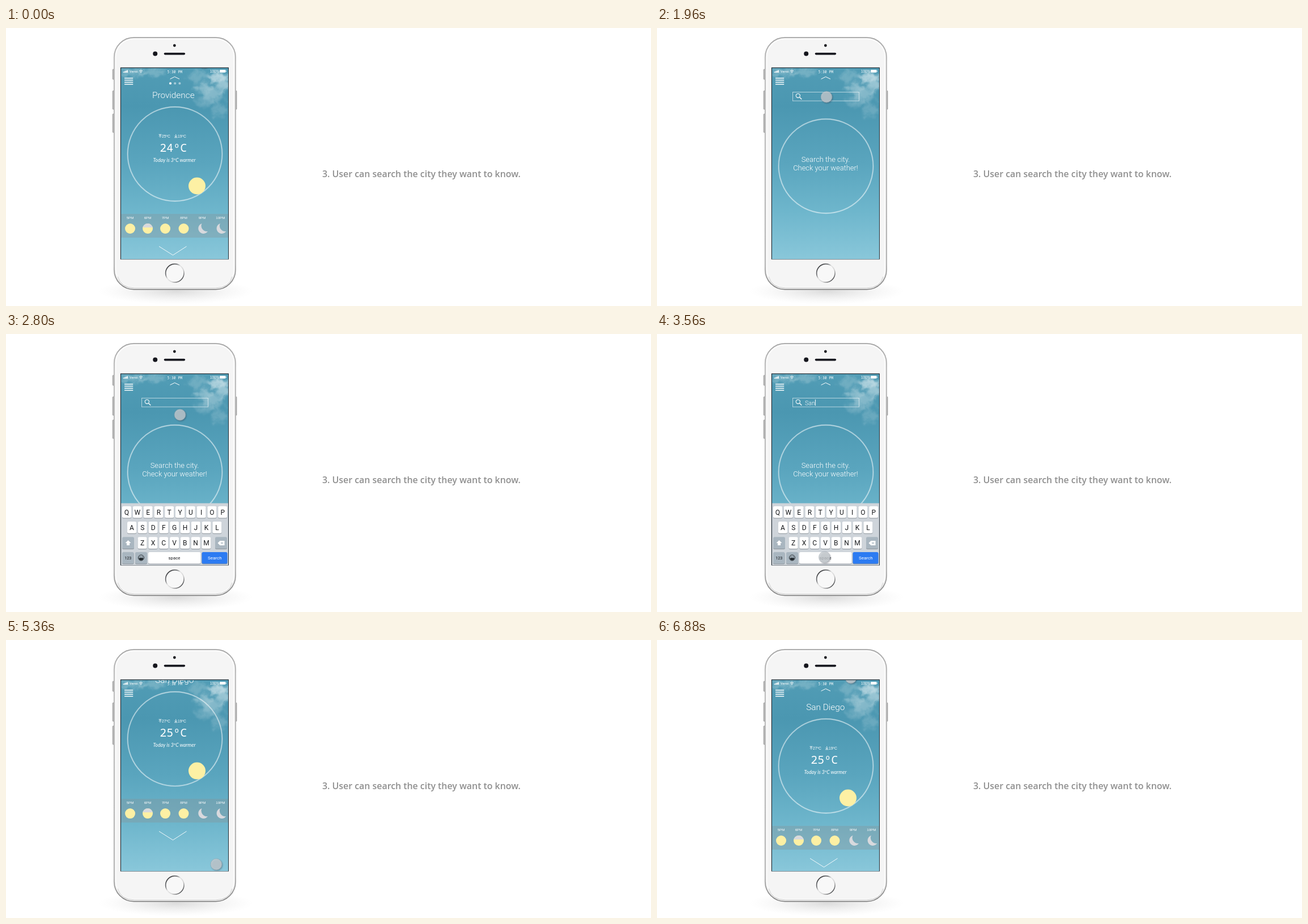
Animation, 1138 px wide and 492 px high, one loop 6920 ms. Source, as an HTML page:

```html
<!DOCTYPE html>
<html lang="en">
<head>
<meta charset="utf-8">
<title>City search</title>
<style>
html, body { margin: 0; width: 100%; height: 100%; overflow: hidden; background: #fff; }
svg { display: block; width: 100%; height: 100%; }
text { fill: #fff; font-family: Roboto, sans-serif; }
.light { font-weight: 300; }
.mid { text-anchor: middle; }
.tiny { font-family: "Liberation Sans", sans-serif; }
.mono { font-family: "Noto Sans Mono", monospace; }
.line { fill: none; stroke: #fff; }
</style>
</head>
<body>
<svg viewBox="0 0 1138 492">
  <defs>
    <linearGradient id="sky" x2="0" y2="1">
      <stop offset="0" stop-color="#519cb5"/>
      <stop offset=".2" stop-color="#4b97b1"/>
      <stop offset=".5" stop-color="#5aa5be"/>
      <stop offset=".75" stop-color="#6eb6cc"/>
      <stop offset="1" stop-color="#89c7da"/>
    </linearGradient>
    <linearGradient id="edge" x2="0" y2="1">
      <stop offset="0" stop-color="#9d9d9d"/>
      <stop offset=".1" stop-color="#b4b4b4"/>
      <stop offset=".9" stop-color="#a9a9a9"/>
      <stop offset="1" stop-color="#7c7c7c"/>
    </linearGradient>
    <linearGradient id="metal" x2="1" y2="1">
      <stop offset=".05" stop-color="#26272a"/>
      <stop offset=".3" stop-color="#6c6e71"/>
      <stop offset=".45" stop-color="#e6e6e6"/>
      <stop offset=".65" stop-color="#d2d2d2"/>
      <stop offset=".9" stop-color="#3a3b3e"/>
    </linearGradient>
    <radialGradient id="ground">
      <stop offset="0" stop-color="#777" stop-opacity=".26"/>
      <stop offset=".6" stop-color="#999" stop-opacity=".1"/>
      <stop offset="1" stop-color="#bbb" stop-opacity="0"/>
    </radialGradient>
    <filter id="cloudy" x="-30%" y="-30%" width="160%" height="160%">
      <feTurbulence type="fractalNoise" baseFrequency=".07" numOctaves="4" seed="8" result="n"/>
      <feGaussianBlur in="SourceGraphic" stdDeviation="3.5" result="b"/>
      <feDisplacementMap in="b" in2="n" scale="22" xChannelSelector="R" yChannelSelector="G"/>
    </filter>
    <filter id="soft" x="-50%" y="-50%" width="200%" height="200%"><feGaussianBlur stdDeviation="1.2"/></filter>
    <clipPath id="glass"><rect x="203" y="71" width="189" height="338"/></clipPath>
  </defs>

  <rect width="1138" height="492" fill="#fff"/>
  <ellipse cx="300" cy="466" rx="137" ry="23" fill="url(#ground)"/>
  <g fill="#b5b5b5" stroke="#808080" stroke-width=".6">
    <rect x="188.2" y="73" width="3" height="18" rx="1"/>
    <rect x="188.2" y="111" width="3" height="33" rx="1"/>
    <rect x="188.2" y="152" width="3" height="33" rx="1"/>
    <rect x="404" y="111" width="3" height="33" rx="1"/>
  </g>
  <rect x="190.7" y="16.7" width="214.4" height="446" rx="35" fill="#e4e4e4" stroke="url(#edge)" stroke-width="1.6"/>
  <rect x="193.5" y="19.2" width="208.8" height="440" rx="32" fill="#f5f5f5" stroke="#fff" stroke-width="1.4"/>
  <path d="M197 440Q203 459 226 460H370Q394 459 399 440" fill="none" stroke="#cfcfcf"/>
  <g fill="#15161d">
    <circle cx="297.3" cy="31" r="2.4"/>
    <circle cx="263.2" cy="45.6" r="4"/>
    <rect x="278.7" y="43.8" width="37.4" height="3.6" rx="1.8"/>
  </g>
  <circle cx="297.8" cy="433.8" r="16.2" fill="#f8f8f8" stroke="url(#metal)" stroke-width="1.6"/>
  <rect x="201.8" y="69.8" width="191.2" height="339.7" fill="#222d36"/>

  <g clip-path="url(#glass)">
    <rect x="203" y="71" width="189" height="338" fill="url(#sky)"/>
    <g id="clouds" fill="#d4e7ec" filter="url(#cloudy)"></g>
    <g id="status"></g>
    <g id="find"></g>
    <g id="home"></g>
    <g id="keys"></g>
    <g id="touch">
      <circle cx="1.2" cy="1.4" r="10.2" fill="#223" opacity=".3" filter="url(#soft)"/>
      <circle r="10" fill="#c9cfd3" opacity=".78" stroke="#98a2a9" stroke-width=".6"/>
    </g>
  </g>

  <text x="558" y="263.8" style="font:600 15.9px 'Open Sans',sans-serif;fill:#8f8f8f">3. User can search the city they want to know.</text>
</svg>
<script>
const LOOP = 6920, STEP = 40;
const $ = id => document.getElementById(id);

const text = (s, x, y, size, cls = "", extra = "") =>
  `<text x="${x}" y="${y}" font-size="${size}" class="${cls}" ${extra}>${s}</text>`;
const disc = (x, y, r, fill, extra = "") =>
  `<circle cx="${x}" cy="${y}" r="${r}" fill="${fill}" ${extra}/>`;
const box = (x, y, w, h, fill, extra = "") =>
  `<rect x="${x}" y="${y}" width="${w}" height="${h}" fill="${fill}" ${extra}/>`;
const line = (d, w = 1, extra = "") => `<path class="line" d="${d}" stroke-width="${w}" ${extra}/>`;
const ring = y =>
  `<circle class="line" cx="298" cy="${y}" r="83.4" stroke-width="2.6" opacity=".22"/>` +
  `<circle class="line" cx="298" cy="${y}" r="83.4" stroke-width="1.1" opacity=".55"/>`;
const caret = line("M289.5 90.3L297.6 86.3L306 90.3", 1);

const SUN = "#fdf0a4", MOON = "#d8d9dd";

function clouds() {
  const puffs = [
    [372, 86, 16, 8, .7], [384, 98, 12, 14, .55], [350, 107, 15, 7, .45],
    [366, 118, 16, 12, .4], [378, 144, 12, 14, .22], [348, 130, 16, 8, .2],
    [340, 86, 20, 8, .25], [258, 78, 26, 6, .3], [222, 78, 20, 7, .3]
  ];
  return puffs.map(([x, y, rx, ry, o]) =>
    `<ellipse cx="${x}" cy="${y}" rx="${rx}" ry="${ry}" opacity="${o}"/>`).join("");
}

function status() {
  let s = "";
  for (let i = 0; i < 4; i++) {
    s += box(206.8 + i * 2.2, 77.3 - i * .9, 1.6, 1.8 + i * .9, "#fff");
    s += box(209, 88 + i * 3.6, 15.2, 1.5, "#fff");
  }
  s += text("Veno", 218, 79.2, 6, "mono");
  s += line("M235 76Q238 73.3 241 76M236.3 77.5Q238 76 239.7 77.5", 1) + disc(238, 78.8, .8, "#fff");
  s += text("5:30 PM", 284.5, 80, 6.3, "mono");
  s += text("100%", 360, 79, 6.3, "tiny");
  s += box(377, 74, 10.5, 4.8, "#fff", 'rx="1"') + box(388, 75.5, .9, 1.8, "#fff");
  return s;
}

function hours() {
  const xs = [219, 250, 281, 313.5, 346, 378.3];
  let s = box(203, 329, 189, 42, "#8a8f93", 'opacity=".33"');
  xs.forEach((x, i) => {
    s += text(5 + i + "PM", x, 338.4, 6.1, "tiny mid");
    if (i < 4) s += disc(x, 355, 9, SUN);
    if (i === 1) s += `<path d="M${x - 8.8} 353a9 9 0 0 1 17.6 0z" fill="${MOON}"/>`;
    if (i > 3) s += `<path d="M${x - .5} 346A9.2 9.2 0 1 0 ${x + 10} 360A10 10 0 0 1 ${x - .5} 346z" fill="${MOON}"/>`;
  });
  return s;
}

function home() {
  const dots = [290, 298.2, 306.4].map((x, i) => disc(x, 98, 2.1, "#fff", `opacity="${i ? .5 : 1}"`)).join("");
  return caret +
    `<g id="dots">${dots}</g>` +
    text("", 0, 123.7, 15.4, "light mid", 'id="city"') +
    ring(223) +
    line("M269.5 188.4H274.5M272 194V189.5M269.7 191.7L272 189.4L274.3 191.7", .8) +
    text("", 275, 194.2, 6.7, "tiny", 'id="high"') +
    line("M297 193.8H302.5M299.7 188V192.7M297.4 190.6L299.7 192.9L302 190.6", .8) +
    text("19ºC", 303, 194.2, 6.7, "tiny") +
    text("", 295.2, 218.8, 20, "mono mid", 'id="now"') +
    text("Today is 3ºC warmer", 297, 237.4, 8.8, "mid", `style="font-family:Lato,sans-serif;font-style:italic"`) +
    disc(337, 279.5, 15, SUN) +
    hours() +
    line("M270 386.5L294.5 402L318.5 386.5", .9);
}

function find() {
  return caret +
    `<rect class="line" x="239.5" y="113.5" width="117" height="15.5" stroke-width=".9" opacity=".65"/>` +
    `<circle class="line" cx="248.8" cy="119.8" r="3.6" stroke-width="1.1"/>` +
    line("M251.5 122.5L255.3 126.2", 1.3) +
    text("", 261, 125.5, 10.7, "light", 'id="typed"') +
    box(0, 115.8, 1, 11, "#fff", 'id="bar"') +
    ring(244.5) +
    text("Search the city.", 297.5, 237.2, 12.9, "light mid") +
    text("Check your weather!", 297.5, 252.3, 12.9, "light mid");
}

const rows = [["QWERTYUIOP", 213, 315.5], ["ASDFGHJKL", 222, 342.7], ["ZXCVBNM", 240.6, 370]];
const spots = { " ": [297, 397] };

function key(x, y, w, h, fill) {
  return box(x, y + 1, w, h, "#8d949b", 'rx="2.5"') + box(x, y, w, h, fill, 'rx="2.5"');
}

function keyboard() {
  const grey = "#a9b6c0";
  const dark = 'style="fill:#16181b"';
  let s = box(203, 299.5, 189, 110, "#ced4da");
  for (const [chars, x0, y] of rows) {
    [...chars].forEach((c, i) => {
      const x = x0 + i * 18.8;
      spots[c] = [x, y];
      s += key(x - 8, y - 10.7, 16, 20.8, "#fff") + text(c, x, y + 4.3, 12, "mid", dark);
    });
  }
  s += key(205, 359.3, 21, 20.8, grey) + key(369, 359.3, 21, 20.8, grey);
  s += `<path d="M215.5 365l5 5h-2.5v4h-5v-4h-2.5z" fill="#fff"/>`;
  s += `<path d="M373.5 370l4-4h8v8h-8z" fill="#fff"/>` + line("M379 368l4 4M383 368l-4 4", 1, `style="stroke:${grey}"`);
  s += key(205, 386, 20.5, 20.6, grey) + key(228, 386, 21, 20.6, grey);
  s += key(251, 386, 92.5, 20.6, "#fff") + key(345.5, 386, 45, 20.6, "#2c7bf2");
  s += text("123", 215.2, 399.2, 7.2, "mid", dark);
  s += `<g fill="none" stroke="#22282d"><circle cx="238.4" cy="396" r="5"/><path d="M235 396.7h6.8a3.4 3.4 0 0 1-6.8 0z" fill="#22282d"/></g>`;
  s += disc(236.6, 394.2, .8, "#22282d") + disc(240.2, 394.2, .8, "#22282d");
  s += text("space", 297, 399, 7.8, "mid", dark) + text("Search", 368.3, 399.2, 8, "mid");
  return s;
}

$("clouds").innerHTML = clouds();
$("status").innerHTML = status();
$("home").innerHTML = home();
$("find").innerHTML = find();
$("keys").innerHTML = keyboard();

const clamp = v => Math.min(1, Math.max(0, v));
const span = (t, from, len) => clamp((t - from) / len);
const both = p => p < .5 ? 4 * p ** 3 : 1 - (2 - 2 * p) ** 3 / 2;
const fast = p => p * p;
const slow = p => 1 - (1 - p) ** 2;

const WORD = "San Diego", FIRST = 3010, BEAT = 171;

// Each stop: time, x, y, easing on the way there.
const path = [
  [0, 349, 61], [160, 349, 61], [960, 302, 125, both], [1200, 302, 125],
  [1900, 299, 122, both], [2600, 299, 122], [2800, 307, 143, fast]
];
[...WORD].forEach((c, i) => {
  path.push([FIRST + i * BEAT, ...spots[c.toUpperCase()], i ? both : slow]);
});
path.push([4480, 357, 353, fast], [4760, 371, 397, slow], [6400, 371, 397], [6880, 342, 67, fast], [LOOP, 345, 62]);

function touchAt(t) {
  const i = Math.max(1, path.findIndex(p => p[0] > t));
  const [t0, x0, y0] = path[i - 1], [t1, x1, y1, ease = p => p] = path[i];
  const p = ease(span(t, t0, t1 - t0));
  return [x0 + (x1 - x0) * p, y0 + (y1 - y0) * p];
}

const shift = (id, x, y) => $(id).setAttribute("transform", `translate(${x.toFixed(2)} ${y.toFixed(2)})`);

function draw(t) {
  const back = t > 4000;
  const away = both(span(t, 1296, 440)) - both(span(t, 5064, 440));
  shift("home", 0, -342 * away);
  $("city").textContent = back ? WORD : "Providence";
  $("city").setAttribute("x", back ? 297.3 : 295.3);
  $("dots").setAttribute("opacity", back ? 0 : 1);
  $("high").textContent = back ? "27ºC" : "25ºC";
  $("now").textContent = back ? "25ºC" : "24ºC";

  $("find").setAttribute("opacity", span(t, 1520, 200) - span(t, 5000, 160));
  const count = t < FIRST ? 0 : Math.min(WORD.length, Math.floor((t - FIRST) / BEAT) + 1);
  const typed = $("typed");
  typed.textContent = WORD.slice(0, count);
  $("bar").setAttribute("x", 261 + (count ? typed.getComputedTextLength() : 0));
  $("bar").setAttribute("opacity", count ? 1 : 0);

  const up = slow(span(t, 2240, 280)) - fast(span(t, 4960, 200));
  shift("keys", 0, 111 * (1 - up));
  shift("touch", ...touchAt(t));
}

function tick() {
  const t = performance.now() % LOOP;
  draw(Math.floor(t / STEP) * STEP);
  requestAnimationFrame(tick);
}
tick();
</script>
</body>
</html>
```
